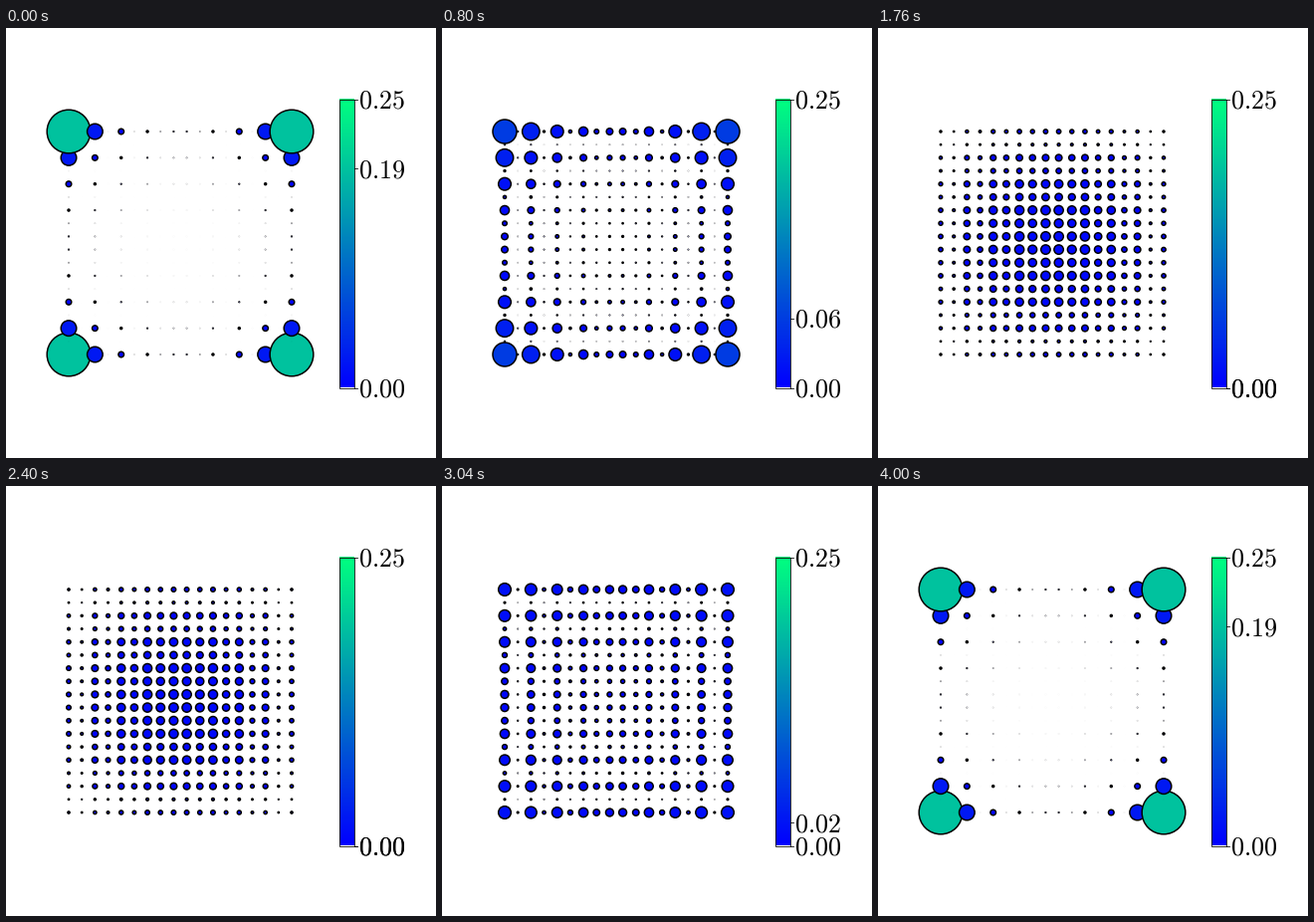
Write a matplotlib script that moves like this. It is 432x432 px and loops after 4.08 s.

```python
import numpy as np
import matplotlib.pyplot as plt
from matplotlib.animation import FuncAnimation
from matplotlib.patches import Rectangle

plt.rcParams["mathtext.fontset"] = "cm"

SIZE, DPI = 432, 72
FRAMES, STEP = 51, 80
SITES = 18
VMAX = 0.25
AREA = 10000                       # marker area per unit of density
BAR_X, BAR_W = 334.5, 15
BAR_TOP, BAR_BOTTOM = 71.5, 361.5


def chain_density(frame):
    """Density of the mid-gap state of a dimerised chain."""
    ratio = np.exp(-1.03 * np.cos(2 * np.pi * frame / (FRAMES - 1)))
    hops = np.ones(SITES - 1)
    hops[::2] = ratio
    h = np.diag(hops, 1) + np.diag(hops, -1)
    return np.linalg.eigh(h)[1][:, SITES // 2] ** 2


def bar_y(value):
    return BAR_BOTTOM + (BAR_TOP - BAR_BOTTOM) * value / VMAX


def add_tick(value):
    y = bar_y(value)
    line, = ax.plot([BAR_X + BAR_W, BAR_X + BAR_W + 3.5], [y, y],
                    color="black", lw=0.8)
    text = ax.text(354.5, y + 9, f"${value:.2f}$", fontsize=26, va="baseline")
    return line, text


fig = plt.figure(figsize=(SIZE / DPI, SIZE / DPI), dpi=DPI, facecolor="white")
ax = fig.add_axes([0, 0, 1, 1])
ax.axis("off")

# Bottom-left site first, top-right site last
xs = 175 + 224 * np.linspace(-0.5, 0.5, SITES)
ys = 216 - 224 * np.linspace(-0.5, 0.5, SITES)
gx, gy = np.meshgrid(xs, ys)
dots = ax.scatter(gx.ravel(), gy.ravel(), c=np.zeros(SITES ** 2), cmap="winter",
                  vmin=0, vmax=VMAX, edgecolors="black", linewidths=1.5)

ax.imshow(np.linspace(1, 0, 256)[:, None], cmap="winter", aspect="auto",
          extent=[BAR_X, BAR_X + BAR_W, BAR_BOTTOM, BAR_TOP])
ax.add_patch(Rectangle((BAR_X, BAR_TOP), BAR_W, BAR_BOTTOM - BAR_TOP,
                       fill=False, ec="black", lw=0.8))
add_tick(0)
add_tick(VMAX)
mark, label = add_tick(0)

ax.set_xlim(0, SIZE)
ax.set_ylim(SIZE, 0)


def draw(frame):
    p = chain_density(frame)
    density = np.outer(p, p).ravel()
    dots.set_sizes(AREA * density)
    dots.set_array(density)
    corner = round(float(density[0]), 2)
    y = bar_y(corner)
    mark.set_ydata([y, y])
    label.set_y(y + 9)
    label.set_text(f"${corner:.2f}$")
    return dots, mark, label


anim = FuncAnimation(fig, draw, frames=FRAMES, interval=STEP,
                     repeat=True, repeat_delay=0, blit=False)
plt.show()
```
